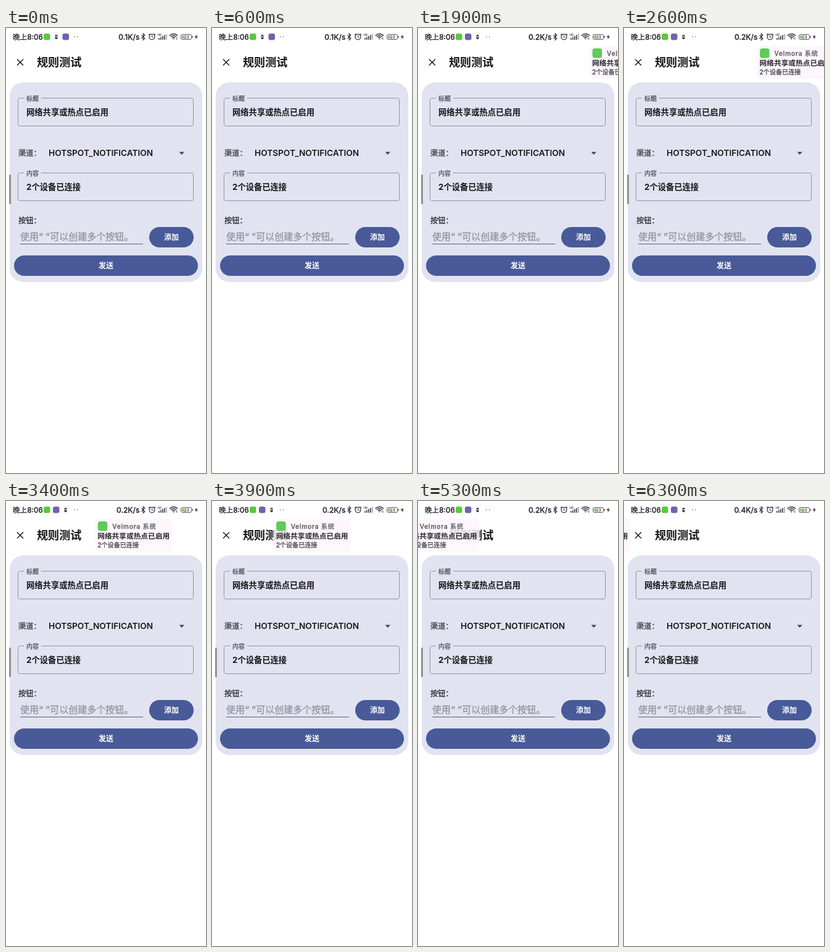
Recreate the animation shown at these times as an HTML page with a canvas. Size 324 by 720 pixels, loop 6400 ms.

```html
<!DOCTYPE html>
<html lang="zh-CN">
<head>
<meta charset="utf-8">
<title>规则测试</title>
<style>
html, body { margin: 0; width: 100%; height: 100%; overflow: hidden; background: #fff; }
canvas { display: block; width: 324px; height: 720px; }
</style>
</head>
<body>
<canvas id="stage"></canvas>
<script>
const LOOP = 6400, STEP = 100;
const W = 324, H = 720;
const FONT = 'Inter, "Noto Sans CJK SC", "Noto Sans CJK", sans-serif';
const INK = '#17171b', GREY = '#55555e', BUTTON = '#485a98', CARD = '#e1e3f0';
const TITLE = '网络共享或热点已启用', BODY = '2个设备已连接';

const canvas = document.getElementById('stage');
const ctx = canvas.getContext('2d');
const ratio = window.devicePixelRatio || 1;
canvas.width = W * ratio;
canvas.height = H * ratio;

// Text is placed by the vertical centre of its characters.
function text(str, x, cy, size, { color = INK, weight = 700, align = 'left', spacing = 0 } = {}) {
  ctx.font = `${weight} ${size}px ${FONT}`;
  ctx.letterSpacing = spacing + 'px';
  ctx.textAlign = align;
  ctx.fillStyle = color;
  ctx.fillText(str, x, cy + size * 0.37);
  // A thin outline stands in for the medium weight that CJK fonts lack.
  if (weight === 500) {
    ctx.strokeStyle = color;
    ctx.lineWidth = 0.3;
    ctx.strokeText(str, x, cy + size * 0.37);
  }
}

function box(x, y, w, h, r, color) {
  ctx.fillStyle = color;
  ctx.beginPath();
  ctx.roundRect(x, y, w, h, r);
  ctx.fill();
}

function outline(x, y, w, h, r, color, width = 1) {
  ctx.strokeStyle = color;
  ctx.lineWidth = width;
  ctx.beginPath();
  ctx.roundRect(x, y, w, h, r);
  ctx.stroke();
}

function line(points, color = '#333338', width = 1) {
  ctx.strokeStyle = color;
  ctx.lineWidth = width;
  ctx.beginPath();
  points.forEach(([x, y]) => ctx.lineTo(x, y));
  ctx.stroke();
}

function polygon(points, color) {
  ctx.fillStyle = color;
  ctx.beginPath();
  points.forEach(([x, y]) => ctx.lineTo(x, y));
  ctx.fill();
}

function arc(x, y, r, from = 0, to = Math.PI * 2, width = 1.3) {
  ctx.strokeStyle = '#333338';
  ctx.lineWidth = width;
  ctx.beginPath();
  ctx.arc(x, y, r, from, to);
  ctx.stroke();
}

function statusBar(t) {
  text('晚上8:06', 11, 14.5, 11.6, { weight: 500, color: '#29292e' });
  const reordered = t >= 1500;
  box(61, 9, 10.5, 10.5, 3, '#58ca3c');
  box(reordered ? 76 : 91.5, 9, 10.5, 10.5, 3, '#7062ad');
  const phone = reordered ? 94.5 : 79.5;
  box(phone, 11, 4, 7, 1, '#44444a');
  box(phone + 1, 13, 2, 2, 0, '#ddd');
  box(110, 13.5, 1.6, 1.6, 0.8, '#555');
  box(115, 13.5, 1.6, 1.6, 0.8, '#555');

  const speed = t < 1900 ? '0.1' : t < 5900 ? '0.2' : '0.4';
  text(speed + 'K/s', 216.5, 14.5, 12, { weight: 500, color: '#29292e', align: 'right' });

  // Bluetooth
  line([[219.5, 11.5], [225, 17], [222.3, 19.5], [222.3, 9], [225, 11.5], [219.5, 17]], '#333338', 1.1);
  // Alarm clock
  arc(236.5, 14.5, 4.4);
  line([[236.5, 12], [236.5, 15], [238.5, 15.5]]);
  line([[231, 11.5], [233.5, 9.3]], '#333338', 1.3);
  line([[239.5, 9.3], [242, 11.5]], '#333338', 1.3);
  // Signal
  text('HD', 245.5, 11, 4.5, { weight: 600, color: '#444' });
  for (let i = 0; i < 5; i++) {
    const h = 3 + i * 1.6;
    box(247 + i * 3, 19 - h, 1.8, h, 0.5, i < 4 ? '#4a4a50' : '#aaa');
  }
  // Wi-Fi
  for (const r of [8.8, 6, 3.2]) arc(271.3, 18.2, r, -Math.PI * 0.77, -Math.PI * 0.23, 1.5);
  box(270.3, 16.5, 2, 2, 1, '#333338');
  text('6', 275, 17.5, 4.5, { weight: 600, color: '#444' });
  // Battery
  outline(283.5, 10.5, 17, 8, 2.5, '#55555a');
  box(285, 12, 4, 5, 1, '#83ca6b');
  text('23', 292.5, 14.6, 6.5, { weight: 600, align: 'center', color: '#333' });
  box(301.5, 13, 1.5, 3, 0.7, '#55555a');
  polygon([[309, 10.5], [305.5, 15], [308, 15], [307, 18.5], [311, 13.7], [308.5, 13.7]], '#333338');
}

function field(y, label, value) {
  outline(19.5, y + 0.5, 284, 45, 3, '#92949b');
  box(29, y - 1, 28, 3, 0, CARD);
  text(label, 33, y + 1, 10, { weight: 500, color: GREY });
  text(value, 33, y + 23, 13.3);
}

function button(label, x, y, w) {
  box(x, y, w, 33, 16.5, BUTTON);
  text(label, x + w / 2, y + 16.7, 12, { color: '#fff', align: 'center' });
}

function ripple(t) {
  const age = (t - 1100) / 400;
  if (age < 0 || age >= 1) return;
  ctx.save();
  ctx.beginPath();
  ctx.roundRect(13, 368, 298, 33, 16.5);
  ctx.clip();
  const radius = 14 + 70 * age;
  const glow = ctx.createRadialGradient(240, 381, 0, 240, 381, radius);
  const alpha = 0.24 * (1 - age);
  glow.addColorStop(0, `rgba(255,255,255,${alpha})`);
  glow.addColorStop(0.6, `rgba(255,255,255,${alpha})`);
  glow.addColorStop(1, 'rgba(255,255,255,0)');
  ctx.fillStyle = glow;
  ctx.fillRect(13, 368, 298, 33);
  ctx.restore();
}

function page(t) {
  line([[18, 50.5], [28, 60.5]], INK, 1.4);
  line([[28, 50.5], [18, 60.5]], INK, 1.4);
  text('规则测试', 50, 55.3, 18.1);

  box(6, 88, 312, 323, 22, CARD);
  field(113, '标题', TITLE);
  text('渠道：', 20, 202.5, 12.3, { weight: 500, color: '#45454c' });
  text('HOTSPOT_NOTIFICATION', 69, 202.3, 13.65, { weight: 600 });
  polygon([[280.5, 200.5], [289, 200.5], [284.75, 205]], '#45454c');
  field(234, '内容', BODY);
  text('按钮：', 20, 311, 12.3, { weight: 500, color: '#2c2c31' });
  text('使用“ ”可以创建多个按钮。', 23, 337.5, 15, { weight: 500, color: '#95959c' });
  line([[23, 349.5], [222, 349.5]], '#606068');
  button('添加', 232, 322, 72);
  button('发送', 13, 368, 298);
  ripple(t);

  if (t < 500 || t >= 1700) box(5, 237, 3, 48, 1.5, '#8f9488');
}

function notification(t) {
  const x = 219.6 - 0.0892 * (t - 2600);
  if (x > W + 4) return;
  box(x - 4, 29, 125, 53, 7, 'rgba(253,245,253,0.84)');
  box(x + 0.5, 33, 15.5, 15.5, 4, '#5fcb58');
  text('Velmora 系统', x + 24, 41, 10.2, { weight: 500, color: '#5c5c63', spacing: 0.8 });
  text(TITLE, x, 56.8, 11.7, { weight: 600, color: '#29292e' });
  text(BODY, x, 71.2, 10.1, { weight: 500, color: '#4a4a50' });
}

function draw(now) {
  const t = Math.floor((now % LOOP) / STEP) * STEP;
  ctx.setTransform(ratio, 0, 0, ratio, 0, 0);
  ctx.fillStyle = '#fff';
  ctx.fillRect(0, 0, W, H);
  page(t);
  statusBar(t);
  notification(t);
}

const start = performance.now();
function tick() {
  draw(performance.now() - start);
  requestAnimationFrame(tick);
}
tick();
</script>
</body>
</html>
```
